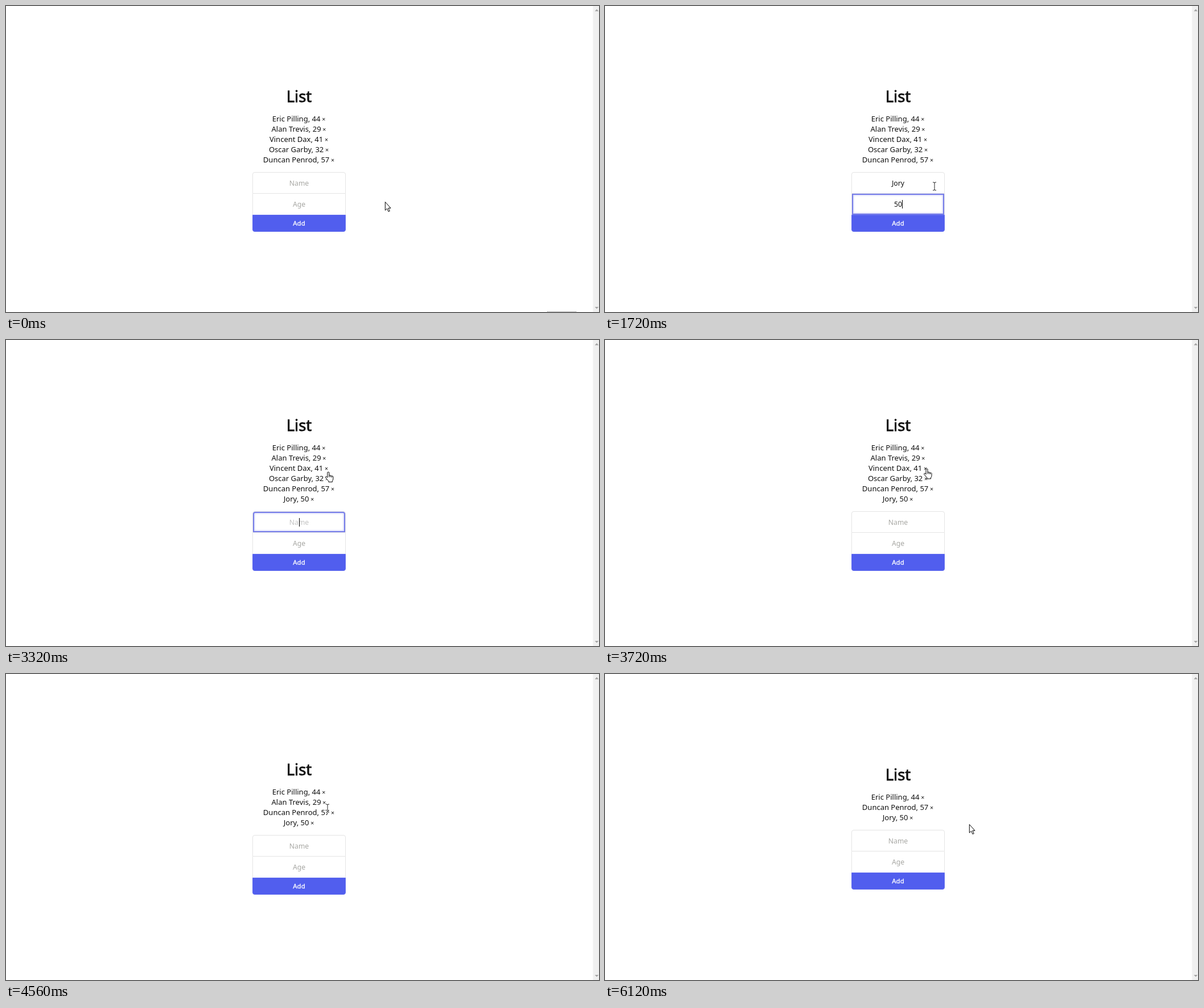
Write an HTML page that moves like this. It is 1042 px wide and 538 px high and loops after 6.64 s.

```html
<!DOCTYPE html>
<html lang="en">
<head>
<meta charset="utf-8">
<title>List</title>
<style>
  * { box-sizing: border-box; }
  html, body { margin: 0; width: 100%; height: 100%; overflow: hidden; background: #fff; }
  body { position: relative; font: 13px/18px "Noto Sans", sans-serif; color: #111; text-align: center; }
  #page { position: absolute; left: 433px; width: 164px; white-space: nowrap; }
  h1 { margin: 0 0 13px; font-size: 27.5px; line-height: 35px; font-weight: 400; -webkit-text-stroke: .8px; }
  #list { margin: 0 1px 13px 0; }
  #list small { font-size: 10.6px; line-height: 1; }
  .field { position: relative; height: 37px; border: solid #e4e4e4; border-width: 0 1px; font-size: 12.2px; line-height: 37px; }
  #name { height: 38px; border-width: 1px; border-radius: 4px 4px 0 0; }
  .field span { position: relative; display: inline-block; }
  .empty span { color: #a8a8a4; }
  .focus.empty span { color: #c3c3c3; }
  .focus::after { content: ""; position: absolute; inset: 0; border: 2px solid #757ce9; border-radius: inherit; box-shadow: inset 0 0 3px 1px #cdd0f8; }
  .focus i { position: absolute; left: 100%; top: 11px; width: 1px; height: 15px; background: #000; }
  .focus.empty i { left: 50%; }
  #add { height: 30px; border: 1px solid #626dee; border-radius: 0 0 4px 4px; background: #515eee; color: #fff; font-size: 11.4px; line-height: 28px; -webkit-text-stroke: .3px; }
  #dots { position: absolute; left: 951px; top: 537px; width: 51px; border-top: 1px dotted #666; }
  svg { position: absolute; left: 0; top: 0; }
  #cursor path { fill: #fff; stroke: #000; stroke-linejoin: round; }
</style>
</head>
<body>
<div id="page">
  <h1>List</h1>
  <div id="list"></div>
  <div id="name" class="field"></div>
  <div id="age" class="field"></div>
  <div id="add">Add</div>
</div>
<div id="dots"></div>
<svg width="1042" height="538">
  <path d="M1031.5 0H1042V538H1031.5Z" fill="#f0f0f0"/>
  <path d="M1034.7 9.2l3.3-3.6 3.3 3.6zM1034.7 529l3.3 3.6 3.3-3.6z" fill="#a3a3a3"/>
  <g id="cursor">
    <path id="arrow" d="M.3 .5V15.2L3.6 12.1L6 17.5L8.2 16.5L5.9 11.3H10Z"/>
    <g id="beam">
      <path d="M-3-7H-1L0-6L1-7H3M0-6V6M-3 7H-1L0 6L1 7H3" style="fill:none;stroke:#fff;stroke-width:2.4"/>
      <path d="M-3-7H-1L0-6L1-7H3M0-6V6M-3 7H-1L0 6L1 7H3" style="fill:none;stroke:#222"/>
    </g>
    <g id="hand" transform="translate(-5.5 -.5)">
      <path d="M4 1.6q1.5-1.6 3 0V7q1.3-1.2 2.4 .3q1.4-.8 2.2 .7q1.8-.6 2.4 1V13q0 2-1.5 3.5V18.5H6V17L1 11q-1-2 .8-2.3q1 0 2.2 2Z"/>
      <path d="M7 7V10M9.4 7.3V10M11.6 8V10.5" style="fill:none"/>
    </g>
  </g>
</svg>
<script>
const LOOP = 6640, STEP = 40;
const $ = id => document.getElementById(id);

// label, first and last moment in the list
const people = [
  ["Eric Pilling, 44", 0, LOOP],
  ["Alan Trevis, 29", 0, 5560],
  ["Vincent Dax, 41", 0, 3960],
  ["Oscar Garby, 32", 0, 4560],
  ["Duncan Penrod, 57", 0, LOOP],
  ["Jory, 50", 2360, LOOP]
];

const path = [ // time, x, y
  [0, 666, 344], [40, 666, 344], [320, 579, 317], [2840, 579, 317], [3480, 565.5, 226],
  [3920, 565.5, 226], [4080, 565, 236.5], [4760, 565, 236], [5160, 561, 228],
  [5520, 561, 228], [5560, 562.5, 230.5], [5840, 562.5, 230.5], [6120, 640, 264], [LOOP, 640, 264]
];
const shapes = [
  [0, "arrow"], [200, "beam"], [2920, "arrow"], [3040, "hand"],
  [4560, "beam"], [4840, "hand"], [5560, "beam"], [5880, "arrow"]
];
const focus = [[0, ""], [480, "name"], [1360, "age"], [2360, "name"], [3720, ""]];
const typed = {
  name: [[0, ""], [840, "J"], [920, "Jo"], [960, "Jor"], [1040, "Jory"], [2360, ""]],
  age: [[0, ""], [1640, "5"], [1720, "50"], [2360, ""]]
};

const at = (steps, t) => steps.findLast(s => s[0] <= t)[1];

function position(t) {
  const i = path.findIndex(p => p[0] > t);
  const [t0, x0, y0] = path[i - 1], [t1, x1, y1] = path[i];
  const e = 1 - (1 - (t - t0) / (t1 - t0)) ** 2;
  return [x0 + (x1 - x0) * e, y0 + (y1 - y0) * e];
}

function drawField(id, hint, t) {
  const text = at(typed[id], t), box = $(id);
  box.className = "field" + (text ? "" : " empty") + (at(focus, t) === id ? " focus" : "");
  box.innerHTML = `<span>${text || hint}<i></i></span>`;
}

function draw(t) {
  const shown = people.filter(([, from, to]) => from <= t && t < to);
  $("page").style.top = 186 - 9 * shown.length + "px";
  $("list").innerHTML = shown.map(([label]) => `<div>${label}<small> ×</small></div>`).join("");
  drawField("name", "Name", t);
  drawField("age", "Age", t);
  $("dots").hidden = t >= 80;
  $("cursor").setAttribute("transform", `translate(${position(t)})`);
  for (const id of ["arrow", "beam", "hand"])
    $(id).style.display = at(shapes, t) === id ? "" : "none";
}

const start = performance.now();
let last = -1;
function tick() {
  const t = Math.floor((performance.now() - start) % LOOP / STEP) * STEP;
  if (t !== last) draw(last = t);
  requestAnimationFrame(tick);
}
tick();
</script>
</body>
</html>
```
